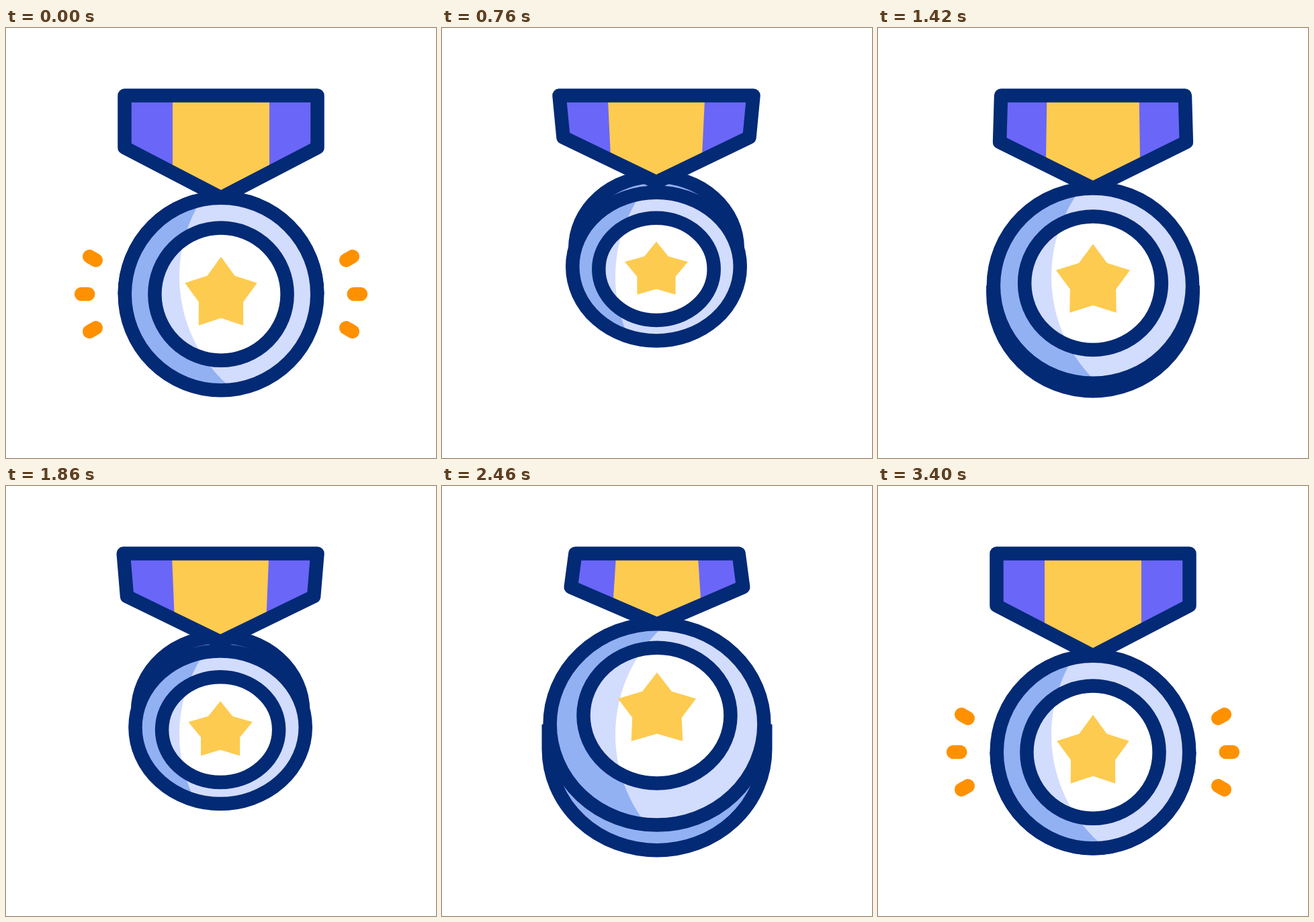
These frames come from a looping animation (640 px wide and 640 px high, 3600 ms). An HTML page with a canvas:

```html
<!DOCTYPE html>
<html lang="en">
<head>
<meta charset="utf-8">
<title>Swinging medal</title>
<style>
  html, body { margin: 0; width: 100%; height: 100%; overflow: hidden; background: #fff; }
  canvas { display: block; width: 640px; height: 640px; }
</style>
</head>
<body>
<canvas id="stage" width="640" height="640"></canvas>
<script>
const ctx = document.getElementById('stage').getContext('2d');
const LOOP = 3600, LINE = 20.5;
const NAVY = '#032a75', PURPLE = '#6a66f8', YELLOW = '#fdcb50';
const MID = '#92b1f3', LIGHT = '#d2dcfd', ORANGE = '#ff9100';

// Swing over time: -1 is fully back, 1 is fully forward.
const SWING = [[0, 0], [692, -1], [1191, 1], [1740, -1], [2353, 1], [2760, 0]];
const BACK_REACH = 1.1, FRONT_REACH = 1.587;

// Each value: [at rest, swung back, swung forward].
const POSE = {
  cx: [320, 319, 320],
  topHalf: [143.5, 144.5, 127],
  sideHalf: [143.5, 138.5, 132],
  sideY: [178, 162.8, 157.3],
  tipY: [252.6, 229.5, 217.3],
  stripeTop: [72, 72.3, 63.5],
  stripeTip: [72, 66.2, 68.6],
  rimY: [396, 355, 365], rimRx: [143.25, 124.7, 155.4], rimRy: [143.25, 110.3, 148.1],
  edgeY: [396, 328, 393], edgeRx: [143.25, 120.7, 156.8], edgeRy: [143.25, 107.2, 148.5],
  ringY: [396.2, 358.8, 355], ringRx: [98.6, 85.7, 106.8], ringRy: [98.6, 76, 100.3],
  starY: [397, 361.5, 349.5], starSx: [1, 0.87, 1.075], starSy: [1, 0.77, 1],
  starSpread: [0, -0.015, 0.048]
};

const ease = u => (1 - Math.cos(Math.PI * Math.min(1, Math.max(0, u)))) / 2;

function swingAt(t) {
  for (let i = 1; i < SWING.length; i++) {
    const [t0, a] = SWING[i - 1], [t1, b] = SWING[i];
    if (t < t1) return a + (b - a) * ease((t - t0) / (t1 - t0));
  }
  return 0;
}

function poseAt(swing) {
  const pose = {};
  for (const key in POSE) {
    const [rest, back, front] = POSE[key];
    pose[key] = swing < 0
      ? rest - (back - rest) * swing * BACK_REACH
      : rest + (front - rest) * swing * FRONT_REACH;
  }
  return pose;
}

function polygon(points) {
  const path = new Path2D();
  points.forEach(([x, y]) => path.lineTo(x, y));
  path.closePath();
  return path;
}

function ellipse(x, y, rx, ry) {
  const path = new Path2D();
  path.ellipse(x, y, rx, ry, 0, 0, 2 * Math.PI);
  return path;
}

function fill(path, color) {
  ctx.fillStyle = color;
  ctx.fill(path);
}

function outline(path) {
  ctx.strokeStyle = NAVY;
  ctx.stroke(path);
}

function fillInside(clip, base, shape, color) {
  fill(clip, base);
  ctx.save();
  ctx.clip(clip);
  fill(shape, color);
  ctx.restore();
}

// The far half of the back disc, with straight sides up to the face.
function drawEdge(p, swing) {
  const edge = new Path2D();
  edge.moveTo(p.cx - p.edgeRx, p.rimY);
  edge.ellipse(p.cx, p.edgeY, p.edgeRx, p.edgeRy, 0, Math.PI, 0, swing >= 0);
  edge.lineTo(p.cx + p.edgeRx, p.rimY);
  fill(edge, MID);
  ctx.lineCap = 'butt';
  outline(edge);
}

function drawRibbon(p) {
  const top = 100.5, x = p.cx;
  const ribbon = polygon([
    [x - p.topHalf, top], [x + p.topHalf, top], [x + p.sideHalf, p.sideY],
    [x, p.tipY], [x - p.sideHalf, p.sideY]
  ]);
  const stripe = polygon([
    [x - p.stripeTop, top], [x + p.stripeTop, top],
    [x + p.stripeTip, p.tipY], [x - p.stripeTip, p.tipY]
  ]);
  fillInside(ribbon, PURPLE, stripe, YELLOW);
  outline(ribbon);
}

function drawStar(p) {
  const radius = 56.5;
  const star = Array.from({ length: 10 }, (_, i) => {
    const r = i % 2 ? 34.8 : radius, a = i * Math.PI / 5;
    const x = r * Math.sin(a), y = -r * Math.cos(a);
    return [p.cx + x * (p.starSx + p.starSpread * y / radius), p.starY + y * p.starSy];
  });
  fill(polygon(star), YELLOW);
}

function drawFace(p) {
  const glare = ellipse(475, 370, 217, 217);
  const rim = ellipse(p.cx, p.rimY, p.rimRx, p.rimRy);
  const ring = ellipse(p.cx, p.ringY, p.ringRx, p.ringRy);
  fillInside(rim, MID, glare, LIGHT);
  outline(rim);
  fillInside(ring, LIGHT, glare, '#fff');
  outline(ring);
  drawStar(p);
}

function drawSparks(t) {
  const grow = t < 1000 ? 1 - ease(t / 240) : ease((t - 3140) / 260);
  if (grow < 0.01) return;
  ctx.strokeStyle = ORANGE;
  ctx.lineCap = 'round';
  for (const side of [-1, 1]) {
    for (const row of [-1, 0, 1]) {
      const [x, y] = row ? [186.2, 50.4] : [197.7, 0];
      const [dx, dy] = row ? [9.6, 5.5] : [10.2, 0];
      ctx.beginPath();
      ctx.moveTo(320 + side * x, 396 + row * y);
      ctx.lineTo(320 + side * (x + dx * grow), 396 + row * (y + dy * grow));
      ctx.stroke();
    }
  }
}

function draw(t) {
  const swing = swingAt(t), pose = poseAt(swing);
  ctx.fillStyle = '#fff';
  ctx.fillRect(0, 0, 640, 640);
  ctx.lineWidth = LINE;
  ctx.lineJoin = 'round';
  drawSparks(t);
  drawEdge(pose, swing);
  drawRibbon(pose);
  drawFace(pose);
}

const start = performance.now();
function tick() {
  draw((performance.now() - start) % LOOP);
  requestAnimationFrame(tick);
}
tick();
</script>
</body>
</html>
```
